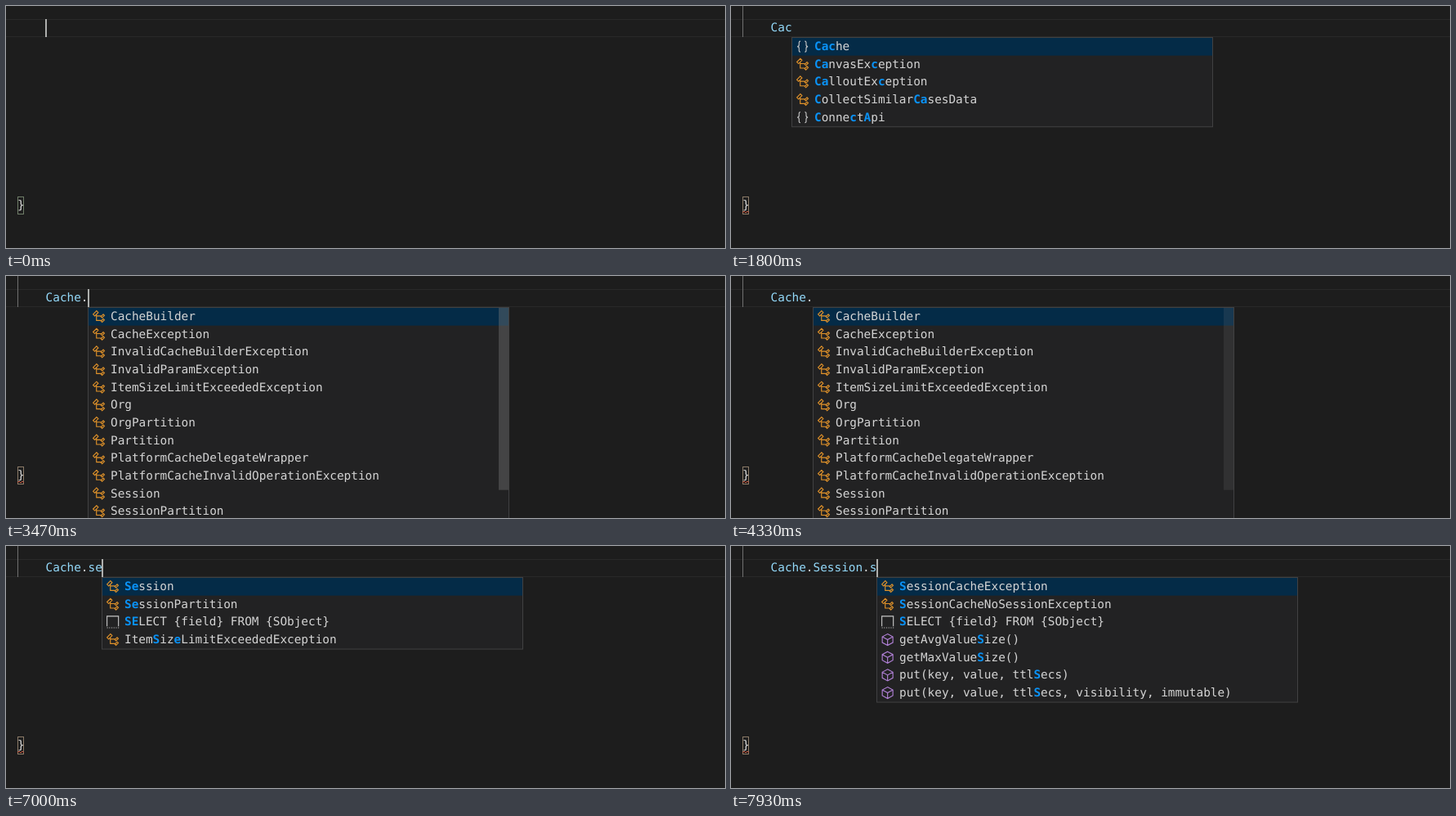
Animation of 880x296 px, one loop 8 s. Source, as an HTML page with a canvas:

```html
<!DOCTYPE html>
<html lang="en">
<head>
<meta charset="utf-8">
<title>Code completion</title>
<style>
  html, body { margin: 0; width: 100%; height: 100%; overflow: hidden; background: #1d1d1d; }
  canvas { display: block; }
</style>
</head>
<body>
<canvas id="stage" width="880" height="296"></canvas>
<script>
const ctx = document.getElementById('stage').getContext('2d');
const LOOP = 8000, FPS = 15;
const FONT = '14.38px "DejaVu Sans Mono", monospace';
const LINE = 21.65, TEXT_X = 48.6, LINE_Y = 16;
const POPUP_Y = 38, POPUP_W = 515, MAX_ROWS = 12;

// Items: kind letter, label with [matched] letters, optional |detail.
const items = text => text.trim().split('\n').map(line => {
  const [label, detail] = line.trim().slice(2).split('|');
  return { kind: line.trim()[0], label, detail };
});

const startC = items(`
  c [C]allable
  c [C]alloutException
  c [C]anvasException
  c [C]ases
  c [C]ollectSimilarCasesData
  c [C]omparable
  n [C]ache
  n [C]anvas
  n [C]hatterAnswers
  n [C]onnectApi
  s [c]lass|Class (Apex)
  s mock[C]allout|Create a mock for an ht…`);

const startCa = items(`
  c [Ca]llable
  c [Ca]lloutException
  c [Ca]nvasException
  c [Ca]ses
  n [Ca]che
  n [Ca]nvas
  c CollectSimilar[Ca]sesData
  s mock[Ca]llout|Create a mock for an ht…
  n [C]h[a]tterAnswers
  n [C]onnect[A]pi
  c [C]omp[a]rable
  s [c]l[a]ss|Class (Apex)`);

const startCac = items(`
  n [Cac]he
  c [Ca]nvasEx[c]eption
  c [Ca]lloutEx[c]eption
  c [C]ollectSimilar[Ca]sesData
  n [C]onne[c]t[A]pi`);

const cacheMembers = items(`
  c CacheBuilder
  c CacheException
  c InvalidCacheBuilderException
  c InvalidParamException
  c ItemSizeLimitExceededException
  c Org
  c OrgPartition
  c Partition
  c PlatformCacheDelegateWrapper
  c PlatformCacheInvalidOperationException
  c Session
  c SessionPartition`);

const memberS = items(`
  c [S]ession
  c [S]essionPartition
  s [S]ELECT {field} FROM {SObject}
  c Item[S]izeLimitExceededException`);

const memberSe = items(`
  c [Se]ssion
  c [Se]ssionPartition
  s [SE]LECT {field} FROM {SObject}
  c Item[S]iz[e]LimitExceededException`);

const sessionMembers = items(`
  c SessionCacheException
  c SessionCacheNoSessionException
  m contains(key)
  m get(cacheBuilder, key)
  m get(key)
  m getAvgGetTime()
  m getAvgValueSize()
  m getKeys()
  m getMaxGetTime()
  m getMaxValueSize()
  m getMissRate()
  m getName()`);

const sessionS = items(`
  c [S]essionCacheException
  c [S]essionCacheNoSessionException
  s [S]ELECT {field} FROM {SObject}
  m getAvgValue[S]ize()
  m getMaxValue[S]ize()
  m put(key, value, ttl[S]ecs)
  m put(key, value, ttl[S]ecs, visibility, immutable)`);

// total: rows including those scrolled out; reveal: when the scrollbar was last shown.
const states = [
  { at: 0, text: '' },
  { at: 50, text: 'C', list: startC, total: 16, reveal: 50 },
  { at: 490, text: 'Ca', list: startCa, total: 13, reveal: 490 },
  { at: 1290, text: 'Cac', list: startCac, total: 5, reveal: 490 },
  { at: 1960, text: 'Cach', list: items('n [Cach]e') },
  { at: 2850, text: 'Cache' },
  { at: 3390, text: 'Cache.', list: cacheMembers, delay: 70, total: 14, reveal: 3390 },
  { at: 5290, text: 'Cache.s', list: memberS },
  { at: 5990, text: 'Cache.se', list: memberSe },
  { at: 7020, text: 'Cache.Session' },
  { at: 7650, text: 'Cache.Session.', list: sessionMembers, delay: 70, total: 18, reveal: 7650 },
  { at: 7920, text: 'Cache.Session.s', list: sessionS }
];

// Icons on a 16 unit grid.
const icons = {
  c: { color: '#e0922a', path: 'M1.5 5.4 5.4 1.5 7.3 3.4 3.4 7.3ZM5.3 5.5V12.4H10.6M5.3 7.3H10.6' +
    'M10.4 8 13 5.4 14.3 6.7 11.7 9.3ZM10.4 13 13 10.4 14.3 11.7 11.7 14.3Z' },
  n: { color: '#c5c5c5', path: 'M5.5 2C3.5 2 4 4 4 5.5S3.5 8 2 8C3.5 8 4 9 4 10.5S3.5 14 5.5 14' +
    'M10.5 2C12.5 2 12 4 12 5.5S12.5 8 14 8C12.5 8 12 9 12 10.5S12.5 14 10.5 14' },
  s: { color: '#c5c5c5', path: 'M1.5 13V1.5H14.5V13M1.5 14.5h1m1.5 0h1m1.5 0h1m1.5 0h1m1.5 0h1m1.5 0h1' },
  m: { color: '#b180d7', path: 'M8 1.5 14 4.7V11.2L8 14.5 2 11.2V4.7ZM2 4.7 8 8 14 4.7M8 8V14.5' }
};
for (const icon of Object.values(icons)) icon.shape = new Path2D(icon.path);

ctx.textRendering = 'geometricPrecision';
ctx.font = FONT;
const CHAR = ctx.measureText('M').width;

function rect(x, y, w, h, color) {
  ctx.fillStyle = color;
  ctx.fillRect(x, y, w, h);
}

function write(text, x, y, color, bold) {
  ctx.font = (bold ? 'bold ' : '') + FONT;
  ctx.fillStyle = color;
  ctx.fillText(text, x, y);
  return x + text.length * CHAR;
}

function drawIcon(kind, x, y) {
  const { color, shape } = icons[kind];
  ctx.save();
  ctx.translate(x, y);
  ctx.scale(1.08, 1.08);
  ctx.strokeStyle = color;
  ctx.lineWidth = 1.05;
  ctx.stroke(shape);
  ctx.restore();
}

function drawBrace(error) {
  const y = LINE_Y + 217;
  ctx.lineWidth = 1;
  ctx.strokeStyle = error ? '#8c7b68' : '#6f7d68';
  ctx.strokeRect(14.5, y + .5, 7, 21);
  write('}', 14, y + 14.5, '#dcdcdc');
  if (!error) return;
  ctx.strokeStyle = '#c8553d';
  ctx.stroke(new Path2D(`M14 ${y + 20}l2-2 2 2 2-2 2 2`));
}

function drawItem({ kind, label, detail }, left, y) {
  drawIcon(kind, left + 5, y + 2);
  let x = left + 28;
  label.split(/[\[\]]/).forEach((part, i) => {
    x = i % 2 ? write(part, x, y + 15, '#0a92f6', true) : write(part, x, y + 15, '#d4d4d4');
  });
  if (detail) {
    const right = left + (detail.endsWith('…') ? 498 : 502);
    write(detail, right - detail.length * CHAR, y + 15, '#8c8c8c');
  }
}

function drawPopup({ list, total, reveal }, left, time) {
  const height = Math.min(list.length, MAX_ROWS) * LINE;
  rect(left, POPUP_Y, POPUP_W + 1, height + 2, '#414142');
  rect(left + 1, POPUP_Y + 1, POPUP_W - 1, height, '#222223');
  rect(left + 1, POPUP_Y + 1, POPUP_W - 1, LINE, '#042b47');
  list.forEach((item, i) => drawItem(item, left, POPUP_Y + 1 + i * LINE));
  if (!total) return;
  const alpha = Math.max(0, Math.min(1, 1 - (time - reveal - 500) / 800));
  rect(left + 503, POPUP_Y + 1, 12, height * list.length / total, `rgba(121,121,121,${.4 * alpha})`);
}

function draw(time) {
  const state = states.findLast(s => s.at <= time);
  const age = time - state.at;
  const caretX = Math.floor(TEXT_X + state.text.length * CHAR);

  rect(0, 0, 880, 296, '#1d1d1d');
  rect(0, LINE_Y, 880, 1, '#292929');
  rect(0, LINE_Y + 21, 880, 1, '#292929');
  if (state.text) rect(14, 0, 1, 38, '#707070');
  drawBrace(state.text !== '');

  let x = TEXT_X;
  for (const part of state.text.split(/(\.)/)) {
    x = write(part, x, LINE_Y + 15, part === '.' ? '#d4d4d4' : '#93d8f8');
  }
  if (state.list && age >= (state.delay || 0)) drawPopup(state, caretX, time);
  if (Math.floor(age / 500) % 2 === 0) rect(caretX, LINE_Y, 2, 22, '#aeafad');
}

function tick() {
  // The screen refreshes in steps of 1/15 s.
  const time = performance.now() % LOOP;
  draw(Math.floor(time * FPS / 1000 + .06) * 1000 / FPS);
  requestAnimationFrame(tick);
}
tick();
</script>
</body>
</html>
```
